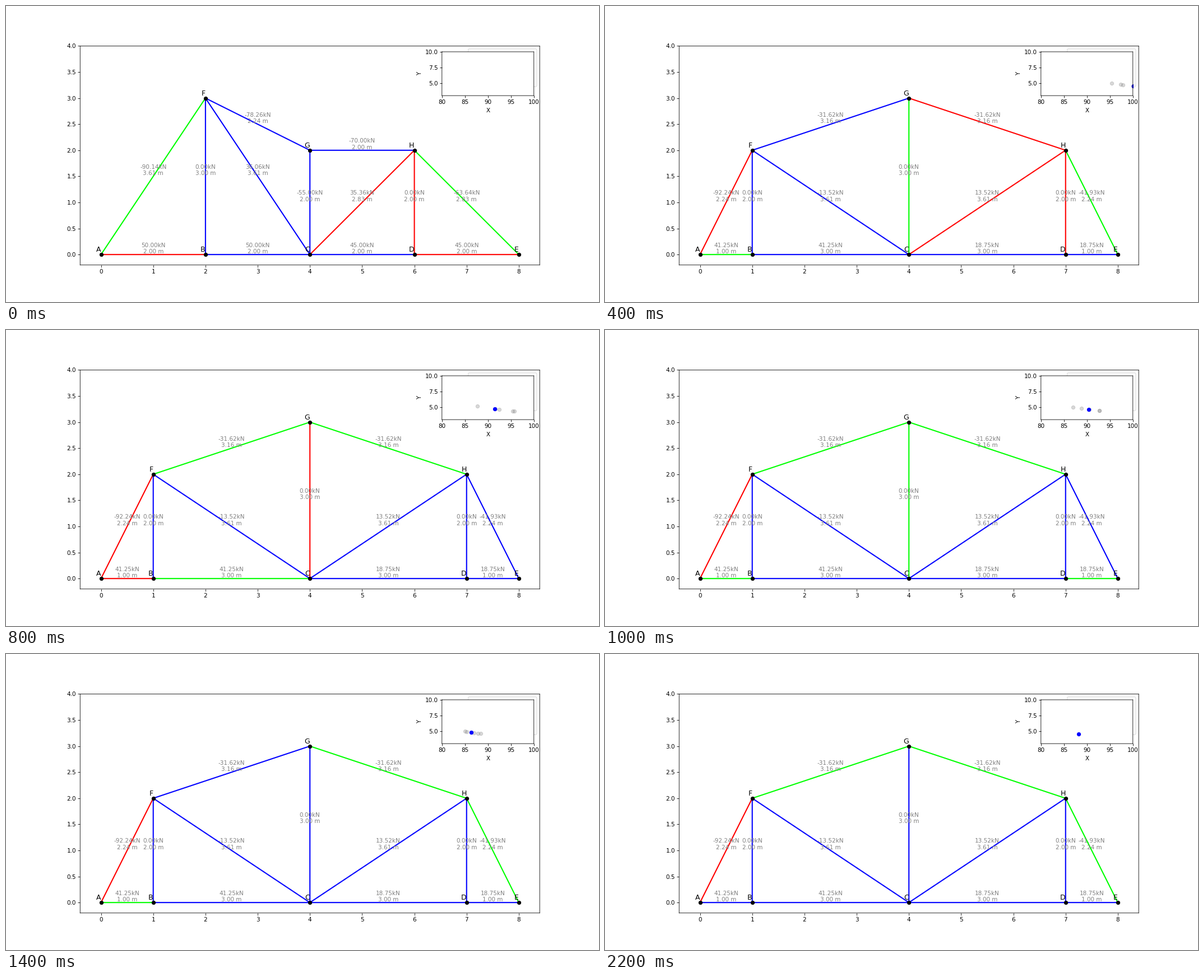
Animation of 1058x529 px, one loop 6.2 s. Source, as a matplotlib script:

```python
import math

import numpy as np
import matplotlib.pyplot as plt
from matplotlib.animation import FuncAnimation
from matplotlib.patches import FancyBboxPatch

W, H, DPI = 1058, 529, 75
STEP_MS, FRAMES = 200, 31

MEMBERS = "AB BC CD DE AF FG GH HE BF CF CG CH DH".split()
LOADS = {"F": 80, "G": 20, "H": 20}  # kN, downwards
RED, GREEN, BLUE = (1, 0, 0), (0, 1, 0), (0, 0, 1)

# Bottom chord x of A-E and top chord heights of F-H
SHAPES = [
    ((0, 2, 4, 6, 8), (3, 2, 2)),
    ((0, 1, 2, 5, 8), (2, 3, 3)),
    ((0, 1, 4, 7, 8), (2, 3, 2)),
]

# Best design of each step: red members, green members, point in the inset
STEPS = [
    ("AB DE CH DH", "AF HE", None),
    ("AB AF CG HE", "BC FG GH", (99.6, 5.1)),
    ("AF GH CH DH", "AB CG HE", (100.1, 4.5)),
    ("AB AF CG HE", "BC", (93.6, 4.8)),
    ("AB AF CG", "BC FG GH", (91.5, 4.75)),
    ("AF", "AB DE FG GH CG", (90.4, 4.66)),
    ("AF", "AB", (88.8, 4.75)),
    ("AF", "AB GH HE", (86.4, 4.8)),
    ("AF", "AB FG GH HE", (87.4, 4.76)),
    ("AF", "AB FG GH HE", (87.4, 4.76)),
    ("AF", "FG GH HE", (88.2, 4.53)),
    ("AF", "FG GH HE", (88.2, 4.53)),
]
LAST = len(STEPS) - 1


def truss_nodes(bottom, top):
    pts = {n: (x, 0) for n, x in zip("ABCDE", bottom)}
    pts.update({n: (x, y) for n, x, y in zip("FGH", bottom[1:4], top)})
    return pts


def member_forces(pts):
    """Method of joints: A is pinned, E rolls, tension is positive."""
    row = {n: 2 * k for k, n in enumerate(pts)}
    a, b = np.zeros((16, 16)), np.zeros(16)
    for col, (p, q) in enumerate(MEMBERS):
        d = np.subtract(pts[q], pts[p]) / math.dist(pts[p], pts[q])
        a[row[p]:row[p] + 2, col] = d
        a[row[q]:row[q] + 2, col] = -d
    for col, r in enumerate((row["A"], row["A"] + 1, row["E"] + 1), len(MEMBERS)):
        a[r, col] = 1
    for n, load in LOADS.items():
        b[row[n] + 1] = load
    return np.linalg.solve(a, b)[:len(MEMBERS)].round(2) + 0.0


def population(step):
    """Rest of the population: a falling front that closes in on the best."""
    if step in (0, LAST):
        return np.empty((0, 2))
    rng = np.random.default_rng(step)
    x, y = STEPS[step][2]
    dx = 7 * (1 - step / LAST) * rng.uniform(-1, 1, 5)
    dx = np.minimum(dx, 100 - x)
    return np.column_stack([x + dx, y - 0.1 * dx])


plt.rcParams["path.snap"] = False

# the tiny surplus keeps the pixel size from rounding down
fig = plt.figure(figsize=((W + 1e-4) / DPI, (H + 1e-4) / DPI), dpi=DPI,
                 facecolor="white")

ax = fig.add_axes([0.125, 0.11, 0.775, 0.77])
ax.set(xlim=(-0.4, 8.4), ylim=(-0.2, 4), aspect="equal",
       xticks=range(9), yticks=np.arange(0, 4.1, 0.5))

# legend frame, mostly hidden by the inset
ax.add_patch(FancyBboxPatch((7.03, 3.221), 1.314, 0.723,
                            boxstyle="round,pad=0,rounding_size=0.022",
                            fc="white", ec="0.8", alpha=0.8, lw=1, zorder=5))

inset = fig.add_axes([777.79 / W, 1 - 160.16 / H, 163.99 / W, 78.27 / H])
inset.set(xlim=(80, 100), ylim=(3, 10), xlabel="X", ylabel="Y",
          xticks=range(80, 101, 5), yticks=(5, 7.5, 10))

lines = [ax.plot([], [], lw=2)[0] for _ in MEMBERS]
notes = [ax.text(0, 0, "", color="gray", size=10, ha="center", va="bottom")
         for _ in MEMBERS]
joints, = ax.plot([], [], "ko", ms=6)
names = {n: ax.text(0, 0, n, size=12, ha="right", va="bottom") for n in "ABCDEFGH"}
crowd = inset.scatter([], [], color="gray", alpha=0.3)
best = inset.scatter([], [], color="blue")

trusses = [truss_nodes(*s) for s in SHAPES]
forces = [member_forces(t) for t in trusses]


def draw(i):
    step = min(i, LAST)
    shape = min(step, len(SHAPES) - 1)
    red, green, point = STEPS[step]
    pts = trusses[shape]
    for m, line, note, force in zip(MEMBERS, lines, notes, forces[shape]):
        p, q = pts[m[0]], pts[m[1]]
        line.set_data(*zip(p, q))
        line.set_color(RED if m in red else GREEN if m in green else BLUE)
        note.set_position(((p[0] + q[0]) / 2, (p[1] + q[1]) / 2))
        note.set_text(f"{force:.2f}kN\n{math.dist(p, q):.2f} m")
    joints.set_data(*zip(*pts.values()))
    for n, (x, y) in pts.items():
        names[n].set_position((x, y + 0.02))
    crowd.set_offsets(population(step))
    best.set_offsets([point] if point else np.empty((0, 2)))
    return []


anim = FuncAnimation(fig, draw, frames=FRAMES, interval=STEP_MS,
                     repeat=True, repeat_delay=0)
plt.show()
```
